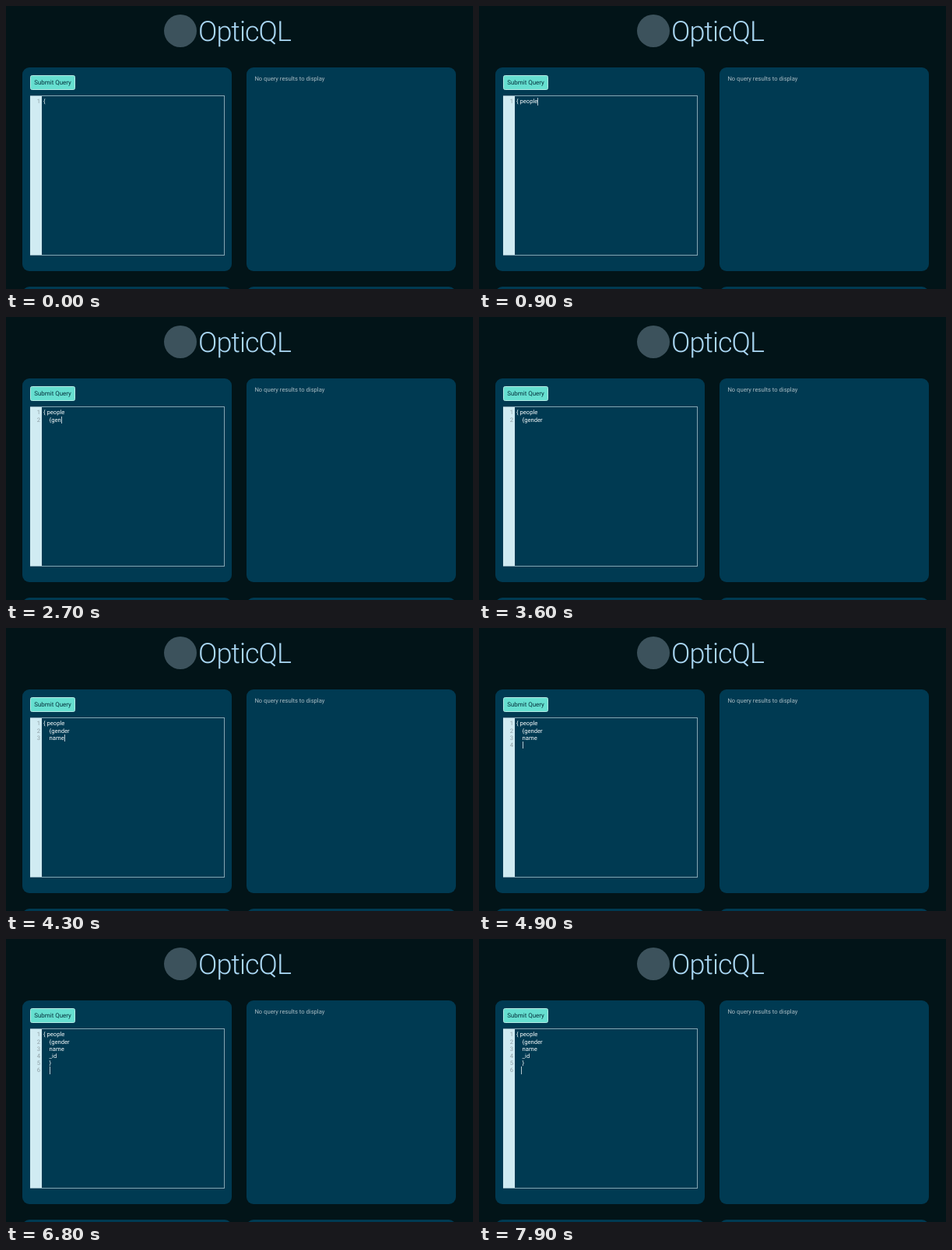
These frames come from a looping animation (600x364 px, 8 s). An HTML page:

```html
<!DOCTYPE html>
<html lang="en">
<head>
<meta charset="utf-8">
<title>OpticQL query editor</title>
<style>
html, body { margin: 0; width: 100%; height: 100%; overflow: hidden; background: #021418; }
#stage {
  position: relative; width: 600px; height: 364px; overflow: hidden;
  font: 400 7.65px/9.24px Roboto, Arial, sans-serif;
  text-rendering: geometricPrecision;
}
#stage div { position: absolute; box-sizing: border-box; white-space: pre; }
.mark { left: 203px; top: 11px; width: 42px; height: 42px; border-radius: 50%; background: #3c525c; }
.title {
  left: 247px; top: 12px; color: #a9d6f2;
  font-size: 36px; line-height: 42px; font-weight: 350; letter-spacing: -1px;
}
.panel { width: 269px; height: 262px; border-radius: 9px; background: #003a52; }
.left { left: 21px; }
.right { left: 309px; }
.upper { top: 79px; }
.lower { top: 361px; }
.button {
  left: 31px; top: 89px; width: 58px; height: 19px;
  border: 1px solid #b4ebe5; border-radius: 2.5px; background: #66dfd0;
  color: #04303c; font-size: 7.95px; line-height: 17.4px; text-align: center;
}
.message { left: 319.4px; top: 89px; color: #a9bbc3; }
.editor { left: 31px; top: 115px; width: 250px; height: 206px; border: 1px solid #86a5b3; }
.gutter { left: 31px; top: 116px; width: 15px; height: 204px; background: #d0ebf2; }
#numbers { left: 31px; top: 118.3px; width: 13px; color: #8f9fa5; text-align: right; }
#code { left: 48px; top: 118.3px; color: #f4f8fa; }
#caret {
  display: inline-block; width: 0; height: 9.24px; margin-right: -1px;
  border-left: 1px solid #b3c6cf; vertical-align: top;
}
</style>
</head>
<body>
<div id="stage">
  <div class="mark"></div>
  <div class="title">OpticQL</div>
  <div class="panel left upper"></div>
  <div class="panel right upper"></div>
  <div class="panel left lower"></div>
  <div class="panel right lower"></div>
  <div class="button">Submit Query</div>
  <div class="message">No query results to display</div>
  <div class="editor"></div>
  <div class="gutter"></div>
  <div id="numbers"></div>
  <div id="code"><span id="text"></span><span id="caret"></span></div>
</div>
<script>
const LOOP = 8000;
const BLINK = 530;
const INDENT = '    ';

// Each run: start time, delay between keys, keys ('\b' deletes one character).
const runs = [
  [-600, 100, ['{']],
  [200, 100, [...' people']],
  [1200, 100, ['\n', ...INDENT]],
  [1900, 100, ['{']],
  [2500, 100, [...'gender']],
  [3700, 100, ['\n' + INDENT]],
  [3900, 100, [...'name']],
  [4600, 100, ['\n' + INDENT]],
  [5500, 200, [...'_id']],
  [6100, 200, ['\n' + INDENT, '}']],
  [6700, 100, ['\n' + INDENT]],
  [7500, 100, ['\b']]
];
const keys = runs.flatMap(([start, gap, list]) =>
  list.map((key, i) => ({ at: start + i * gap, key })));

const [numbers, text, caret] =
  ['numbers', 'text', 'caret'].map(id => document.getElementById(id));

function stateAt(time) {
  let typed = '', last = 0;
  for (const { at, key } of keys) {
    if (at > time) break;
    typed = key === '\b' ? typed.slice(0, -1) : typed + key;
    last = at;
  }
  return { typed, caretOn: Math.floor((time - last) / BLINK) % 2 === 0 };
}

let shown = null;
function draw(time) {
  const { typed, caretOn } = stateAt(time);
  if (typed !== shown) {
    shown = typed;
    text.textContent = typed;
    numbers.textContent = typed.split('\n').map((_, i) => i + 1).join('\n');
  }
  caret.style.visibility = caretOn ? 'visible' : 'hidden';
}

const begin = performance.now();
function tick() {
  draw((performance.now() - begin) % LOOP);
  requestAnimationFrame(tick);
}
tick();
</script>
</body>
</html>
```
